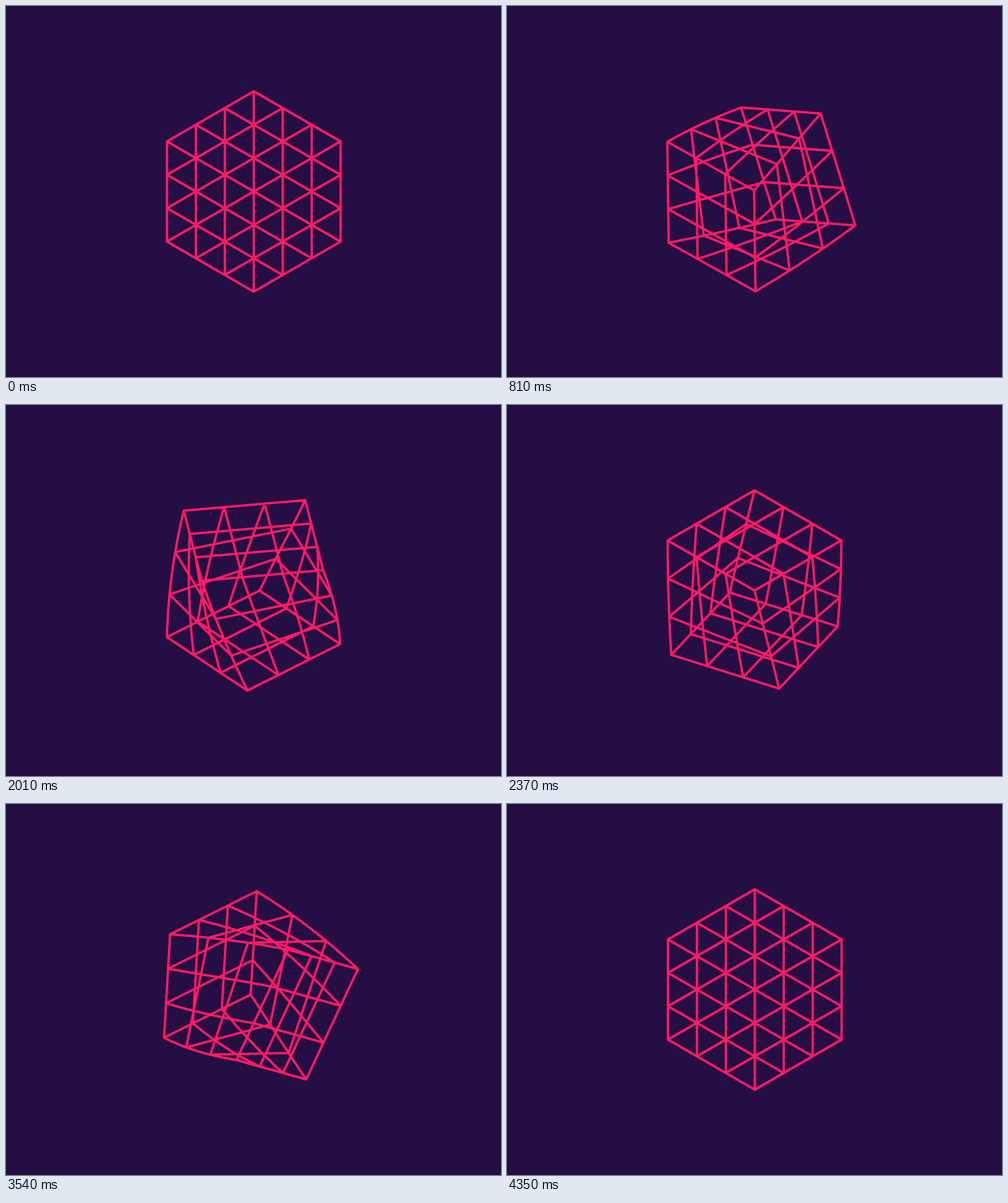
Recreate the animation shown at these times as an HTML page with a canvas. Size 800x600 px, loop 4.59 s.

```html
<!DOCTYPE html>
<html lang="en">
<head>
<meta charset="utf-8">
<title>Twisting grid cube</title>
<style>
  html, body { margin: 0; width: 100%; height: 100%; overflow: hidden; background: #250e43; }
  canvas { display: block; }
</style>
</head>
<body>
<canvas id="stage" width="800" height="600"></canvas>
<script>
const ctx = document.getElementById('stage').getContext('2d');
const LOOP = 4590, STEP = 30;
const CELLS = 3, SMOOTH = 8;

// Isometric projections of the three cube edges
const EDGES = [[140.3, -81], [-140.3, -81], [0, 162]];

// Each turn twists the cube a quarter around one axis
const TURNS = [
  { start: 30, axis: 0, cx: 400.5 },
  { start: 1530, axis: 2, cx: 400 },
  { start: 3060, axis: 1, cx: 400.5 }
];

// Ease along a cubic Bezier with handles (x1, 0) and (x2, 1)
function ease(x, x1, x2) {
  if (x <= 0) return 0;
  if (x >= 1) return 1;
  let lo = 0, hi = 1, s;
  for (let i = 0; i < 30; i++) {
    s = (lo + hi) / 2;
    const r = 1 - s;
    if (3 * x1 * s * r * r + 3 * x2 * s * s * r + s * s * s < x) lo = s;
    else hi = s;
  }
  return s * s * (3 - 2 * s);
}

function draw(time) {
  const turn = TURNS.findLast(t => time >= t.start) || TURNS[0];
  const local = time - turn.start;
  const lead = ease(local / 840, 0.74, 0.56);
  const trail = ease((local - 380) / 910, 0.35, 0.15);
  const k = turn.axis, i = (k + 1) % 3, j = (k + 2) % 3;

  function project(p) {
    const angle = Math.PI / 2 * (lead + (trail - lead) * (p[k] + 0.5));
    const c = Math.cos(angle), s = Math.sin(angle);
    const q = [];
    q[k] = p[k];
    q[i] = c * p[i] + s * p[j];
    q[j] = c * p[j] - s * p[i];
    const sum = d => EDGES.reduce((total, e, n) => total + e[d] * q[n], 0);
    return [turn.cx + sum(0), 300 + sum(1)];
  }

  ctx.fillStyle = '#250e43';
  ctx.fillRect(0, 0, 800, 600);
  ctx.strokeStyle = '#ff1a66';
  ctx.lineWidth = 3.8;
  ctx.lineCap = ctx.lineJoin = 'round';
  ctx.beginPath();
  for (let along = 0; along < 3; along++) {
    const steps = along === k ? CELLS * SMOOTH : 1;
    for (let a = 0; a <= CELLS; a++) {
      for (let b = 0; b <= CELLS; b++) {
        // Only lines on the surface of the cube
        if (a % CELLS && b % CELLS) continue;
        const p = [];
        p[(along + 1) % 3] = a / CELLS - 0.5;
        p[(along + 2) % 3] = b / CELLS - 0.5;
        for (let n = 0; n <= steps; n++) {
          p[along] = n / steps - 0.5;
          const [x, y] = project(p);
          if (n) ctx.lineTo(x, y);
          else ctx.moveTo(x, y);
        }
      }
    }
  }
  ctx.stroke();
}

function tick() {
  const time = performance.now() % LOOP;
  draw(Math.floor(time / STEP) * STEP);
  requestAnimationFrame(tick);
}
tick();
</script>
</body>
</html>
```
